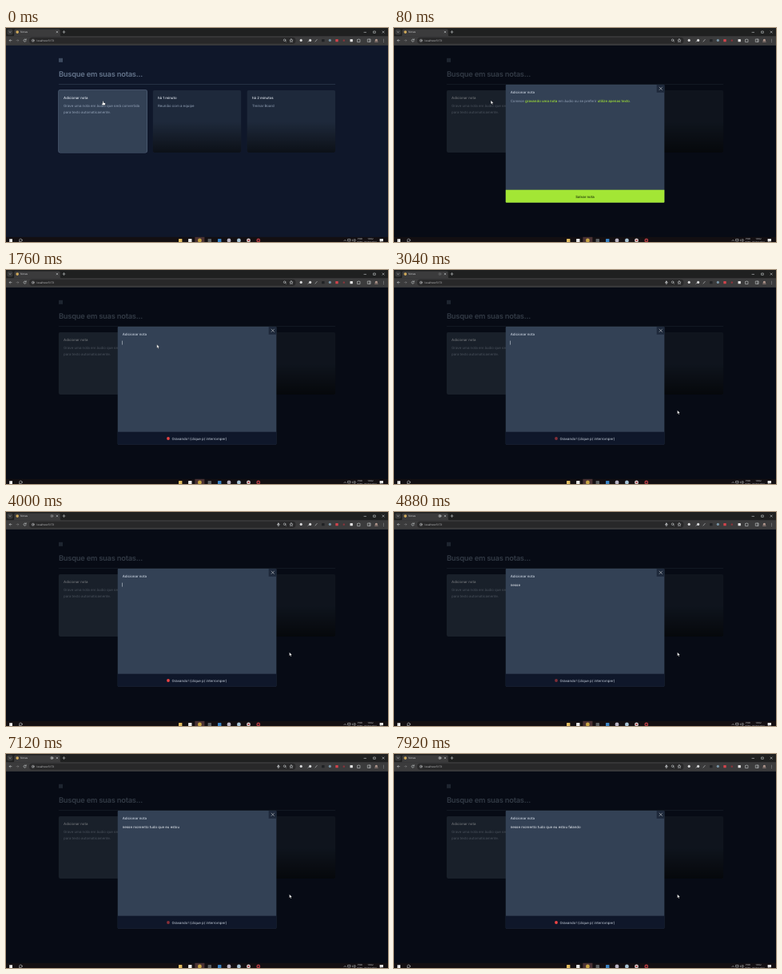
Write an HTML page that moves like this. It is 478x268 px and loops after 8000 ms.

```html
<!DOCTYPE html>
<html lang="pt-BR">
<head>
<meta charset="utf-8">
<title>Notas</title>
<style>
  html, body { margin: 0; width: 100%; height: 100%; overflow: hidden; background: #0f172a; }
  svg { display: block; width: 478px; height: 268px; }
  text { font: 400 4.36px Inter, sans-serif; text-rendering: geometricPrecision; white-space: pre; }
  .ui { font: 400 3.3px "Open Sans", sans-serif; fill: #d6d7d9; }
  .clock { font-size: 2.9px; text-anchor: middle; }
  .search { font-size: 9.33px; font-weight: 600; letter-spacing: -.025em; fill: #64748b; }
  .head { font-weight: 500; fill: #e2e8f0; }
  .body { fill: #94a3b8; }
  .link { font-weight: 500; fill: #a3e635; }
  .mid { text-anchor: middle; }
  .line { fill: none; stroke: #c7c9cc; stroke-width: .6; stroke-linecap: round; stroke-linejoin: round; }
</style>
</head>
<body>
<svg viewBox="0 0 478 268">
  <defs>
    <linearGradient id="fade" x1="0" y1="0" x2="0" y2="1">
      <stop offset="0" stop-color="#000" stop-opacity="0"/>
      <stop offset="1" stop-color="#000" stop-opacity=".6"/>
    </linearGradient>
    <clipPath id="round"><rect x="139.5" y="70.8" width="199.1" height="148" rx="1.5"/></clipPath>
  </defs>

  <rect width="478" height="268" fill="#0f172a"/>

  <!-- page -->
  <rect x="66" y="37.8" width="5" height="5" fill="#3d4b60"/>
  <text class="search" x="65.9" y="60.6">Busque em suas notas...</text>
  <rect x="65.9" y="70" width="346.2" height=".6" fill="#334155"/>
  <g id="cards"></g>
  <rect id="shade" y="21" width="478" height="241" fill="#000" fill-opacity=".5"/>

  <!-- dialog -->
  <g id="dialog" clip-path="url(#round)">
    <rect x="139.5" y="70.8" width="199.1" height="148" fill="#334155"/>
    <rect x="328.7" y="70.8" width="10" height="10" fill="#1e293b"/>
    <path class="line" d="M332.1 74.1l3.4 3.4m0-3.4l-3.4 3.4"/>
    <text class="head" x="145.7" y="82.1" style="fill:#cbd5e1">Adicionar nota</text>
    <g id="intro">
      <text class="body" x="145.7" y="92.6">Comece <tspan class="link">gravando uma nota</tspan> em áudio ou se preferir <tspan class="link">utilize apenas texto</tspan>.</text>
      <rect x="139.5" y="202.7" width="199.1" height="16.2" fill="#a3e635"/>
      <text class="mid" x="239" y="212.5" fill="#1a2e05" font-weight="500" style="font-weight:500">Salvar nota</text>
    </g>
    <g id="record">
      <text id="speech" x="145.7" y="92.6" fill="#eef2f7"></text>
      <rect id="caret" x="145.4" y="88.6" width=".5" height="5" fill="#e2e8f0"/>
      <rect x="139.5" y="202.7" width="199.1" height="16.2" fill="#0f172a"/>
      <circle id="dot" cx="203" cy="211" r="1.9" fill="#ef4444"/>
      <text x="207.4" y="212.5" fill="#cbd5e1">Gravando! (clique p/ interromper)</text>
    </g>
  </g>

  <!-- browser -->
  <rect width="478" height="22" fill="#3b3b3c"/>
  <rect width="478" height="10.2" fill="#1f2020"/>
  <rect x="1.5" y="1.5" width="7" height="7" rx="1.8" fill="#38393a"/>
  <path class="line" d="M4 4.6l1.1 1 1.1-1"/>
  <path d="M8.5 10.4q1.7 0 1.7-2V3.2q0-1.8 1.8-1.8h54q1.8 0 1.8 1.8v5.2q0 2 1.7 2z" fill="#3b3b3c"/>
  <circle cx="14.2" cy="5.1" r="1.8" fill="#d3ac5a"/>
  <text class="ui" x="18" y="6.3">Notas</text>
  <path class="line" d="M63 4.1l1.8 1.8m0-1.8l-1.8 1.8M71 5h3m-1.5-1.5v3"/>
  <g id="live">
    <circle class="line" cx="57.4" cy="5" r="1.6"/>
    <circle cx="57.4" cy="5" r=".8" fill="#f0f0f0"/>
  </g>
  <path class="line" d="M448 5.4h2.6M460 4h2.3v2.3H460zM471 3.9l2.3 2.3m0-2.3l-2.3 2.3"/>
  <path class="line" d="M7 15.6H4.2m1.2-1.2l-1.2 1.2 1.2 1.2"/>
  <path class="line" stroke-opacity=".4" d="M13 15.6h2.8m-1.2-1.2l1.2 1.2-1.2 1.2"/>
  <path class="line" d="M25 14.7a1.6 1.6 0 1 0 .1 1.6M25.2 13.7v1.2H24"/>
  <rect x="29" y="11.8" width="333.5" height="7.9" rx="3.9" fill="#282829"/>
  <circle cx="33.8" cy="15.7" r="2.6" fill="#3b3b3c"/>
  <circle class="line" cx="33.8" cy="15.7" r="1.2"/>
  <text class="ui" x="38.6" y="16.9" style="font-size:3.2px">localhost:5173</text>
  <g id="mic">
    <rect x="340.1" y="13.6" width="1.5" height="2.6" rx=".7" fill="#c7c9cc"/>
    <path class="line" stroke-width=".4" d="M339.4 15.4q0 1.6 1.5 1.6t1.5-1.6M340.9 17v.8"/>
  </g>
  <circle class="line" cx="348.6" cy="15.2" r="1.3"/>
  <path class="line" d="M349.6 16.2l1 1M357 13.6l.6 1.4 1.5.1-1.1 1 .3 1.5-1.3-.8-1.3.8.3-1.5-1.1-1 1.5-.1z"/>
  <g id="tools"></g>
  <path class="line" d="M378 17.2l2.8-2.8M387 17l2.2-2.6M440 14.4h1q.4-1.4 1 0h1v3.2h-3zM452.7 14h3.4v3.4h-3.4zM455 14v3.4"/>
  <path d="M461 18q.2-2.2 2.4-2.2t2.4 2.2z" fill="#786a66"/>
  <g fill="#c7c9cc"><circle cx="472.6" cy="14.1" r=".45"/><circle cx="472.6" cy="15.7" r=".45"/><circle cx="472.6" cy="17.3" r=".45"/></g>
  <rect y="21.2" width="478" height=".8" fill="#303236"/>

  <!-- taskbar -->
  <rect y="261.8" width="478" height="6.2" fill="#130f12"/>
  <rect x="236.4" y="261.8" width="12" height="6.2" fill="#4a3234"/>
  <rect x="4.2" y="264.2" width="3.8" height="3.8" fill="#e8e8e8"/>
  <circle class="line" cx="18.4" cy="265.8" r="1.8"/>
  <path class="line" d="M17.1 267.1l-1 1M423 266.6l1.2-1.2 1.2 1.2M428 264.4h3v2.4h-3zM433.6 265.2v1.4M435.2 264.6q1.4 1.2 0 2.5M436.6 264.2q2 1.6 0 3.4"/>
  <g id="dock"></g>
  <text class="ui clock" x="443" y="265.3">POR</text>
  <text class="ui clock" x="443" y="268.8">PTB2</text>
  <text class="ui clock" x="456" y="265.3">19:02</text>
  <text class="ui clock" x="456" y="268.8">06/02/2024</text>
  <path d="M467.6 264h4.4v3.2h-2.4l-1 1v-1h-1z" fill="#e4e4e4"/>

  <!-- pointer -->
  <g id="pointer">
    <path id="arrow" d="M0 0v4.4l1-.9.7 1.6.8-.3-.7-1.6h1.4z" fill="#fff" stroke="#111" stroke-width=".25"/>
    <path id="hand" d="M-.5 .3q.5-.6 1 0v1.6l1.9.5q.5.2.4.8l-.4 1.9H-.6L-1.8 3.3q0-.7.7-.4l.6.4z" fill="#fff" stroke="#111" stroke-width=".25"/>
  </g>
</svg>
<script>
const LOOP = 8000, STEP = 80;
const OPEN = 80, RECORD = 1600, LIVE = 2000;
const $ = id => document.getElementById(id);

const cards = [
  ['Adicionar nota', 'Grave uma nota em áudio que será convertida', 'para texto automaticamente.'],
  ['há 1 minuto', 'Reunião com a equipe'],
  ['há 2 minutos', 'Treinar Board']
];
$('cards').innerHTML = cards.map(([title, ...lines], i) => {
  const x = 65.9 + i * 117.9;
  const box = (y, h, fill, more = '') =>
    `<rect x="${x}" y="${y}" width="110.4" height="${h}" rx="1.8" fill="${fill}" ${more}/>`;
  return (i ? '' : box(78, 77.9, 'none', 'id="ring" stroke="#53627a" stroke-width="1.3"'))
    + box(78, 77.9, i ? '#1e293b' : '#334155')
    + (i ? box(117, 38.9, 'url(#fade)') : '')
    + `<text class="head" x="${x + 6.2}" y="88.9">${title}</text>`
    + lines.map((s, n) => `<text class="body" x="${x + 6.2}" y="${99.4 + n * 7.3}">${s}</text>`).join('');
}).join('');

const discs = (list, y, r) => list.map(([x, fill]) => `<circle cx="${x}" cy="${y}" r="${r}" fill="${fill}"/>`).join('');
const tiles = (list, y, s) => list.map(([x, fill]) =>
  `<rect x="${x - s / 2}" y="${y - s / 2}" width="${s}" height="${s}" rx=".5" fill="${fill}"/>`).join('');

$('tools').innerHTML =
  discs([[369.2, '#d9dadb'], [380.6, '#d9dadb'], [405.3, '#7893a5'], [463.4, '#b79c91']], 15.4, 1.6)
  + tiles([[396.8, '#202224'], [414, '#d2444c'], [432.2, '#e6e6e6']], 15.6, 3.4)
  + tiles([[422.8, '#8d343b']], 15.6, 2.2);
$('dock').innerHTML =
  tiles([[218.2, '#e0bb60'], [230.3, '#e8e8e8'], [254.8, '#5c6063'], [267.2, '#3a83c4']], 266.2, 4.4)
  + discs([[242.4, '#c8a544'], [279, '#b9b5c5'], [291.4, '#a9c4d6'], [303.5, '#d8d0d0'], [315.8, '#b23b42']], 266, 2.4)
  + discs([[303.5, '#a93238'], [315.8, '#2a2023']], 266, 1.1);

// time, x, y of the pointer tip
const path = [[0, 121.5, 91.5], [80, 121.2, 90.7], [160, 121.2, 90.7], [800, 171.6, 95.6],
  [1040, 171.6, 95.6], [1360, 184, 91], [1680, 184, 91], [2480, 354.6, 175.8]];
const words = [[4720, 'nesse'], [5360, ' momento'], [5920, ' tudo'], [6480, ' que'],
  [6640, ' eu'], [6960, ' estou'], [7440, ' falando']];

const ease = p => p * p * (3 - 2 * p);
function place(t) {
  const i = path.findIndex(k => k[0] > t);
  if (i < 0) return path[path.length - 1].slice(1);
  const [t0, x0, y0] = path[i - 1], [t1, x1, y1] = path[i];
  const p = ease((t - t0) / (t1 - t0));
  return [x0 + (x1 - x0) * p, y0 + (y1 - y0) * p];
}
const show = (id, on) => { $(id).style.display = on ? '' : 'none'; };
const wave = (t, period) => (1 + Math.cos(t / period * 2 * Math.PI)) / 2;

function draw(t) {
  const open = t >= OPEN, rec = t >= RECORD, live = t >= LIVE;
  show('ring', !open);
  show('shade', open);
  show('dialog', open);
  show('intro', !rec);
  show('record', rec);
  show('mic', live);
  show('live', live);
  $('live').style.opacity = .3 + .65 * wave(Math.min(t, 4880) - 4880, 1227);
  $('dot').style.opacity = .5 + .5 * wave(t - 1920, 2000);

  const text = words.filter(w => t >= w[0]).map(w => w[1]).join('');
  $('speech').textContent = text;
  show('caret', !text && (t - RECORD) % 1000 < 500);

  const [x, y] = place(t);
  $('pointer').setAttribute('transform', `translate(${x} ${y})`);
  const hand = !open || (t >= 1200 && t < RECORD);
  show('hand', hand);
  show('arrow', !hand);
}

const start = performance.now();
function tick() {
  const t = (performance.now() - start) % LOOP;
  draw(Math.floor(t / STEP) * STEP);
  requestAnimationFrame(tick);
}
tick();
</script>
</body>
</html>
```
